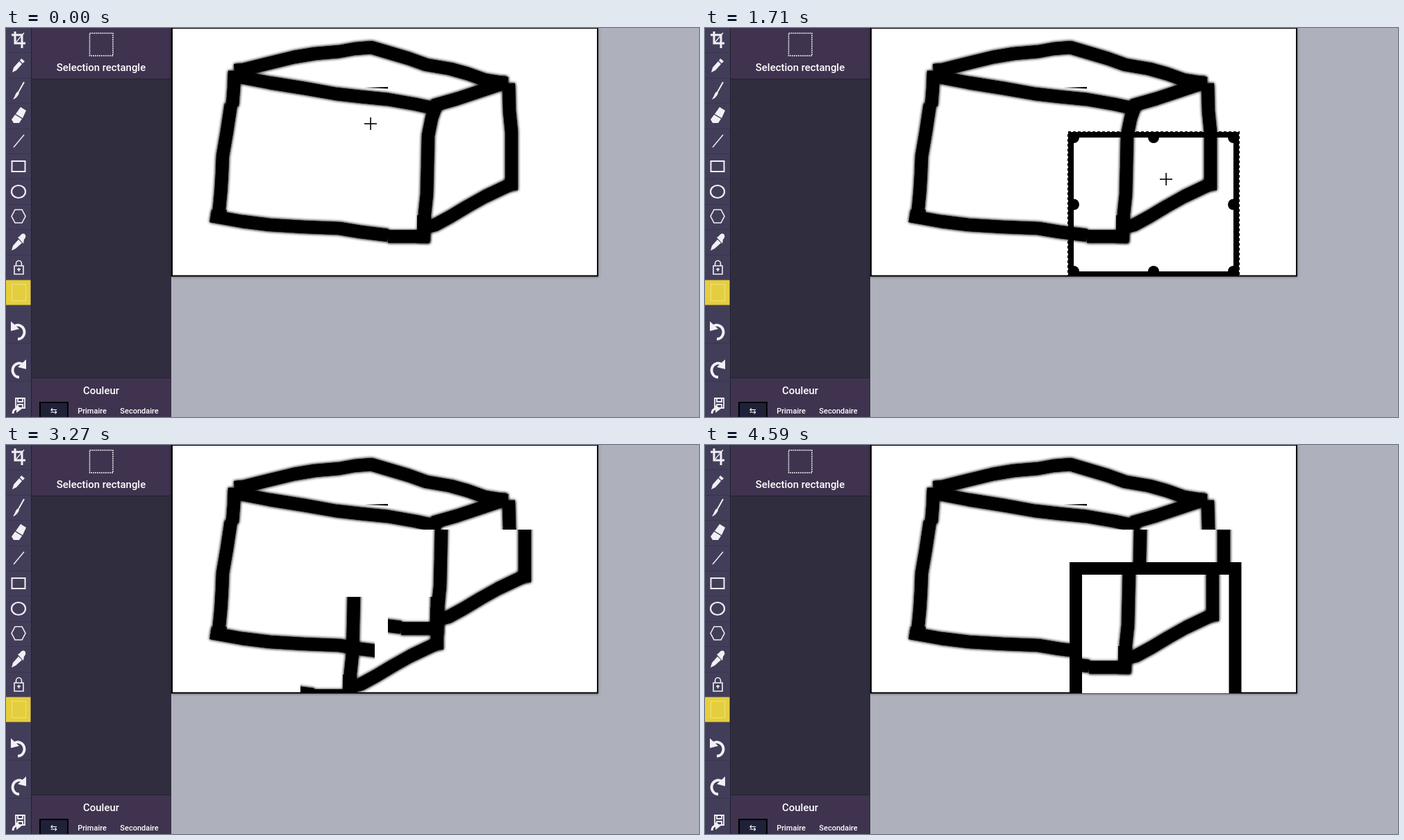
An HTML page with a canvas for the animation above (4.68 s loop, 998 px wide and 561 px high).

```html
<!DOCTYPE html>
<html lang="fr">
<head>
<meta charset="utf-8">
<style>
html, body { margin: 0; width: 100%; height: 100%; overflow: hidden; background: #aeb1bc; }
canvas { display: block; }
</style>
</head>
<body>
<canvas id="stage" width="998" height="561"></canvas>
<script>
const LOOP = 4680, STEP = 30;
const SEL = { x: 531, y: 158, w: 230, h: 193 };
const ctx = document.getElementById('stage').getContext('2d');

function layer(paint) {
  const c = document.createElement('canvas');
  c.width = 998;
  c.height = 561;
  paint(c.getContext('2d'));
  return c;
}

function box(g, color, x, y, w, h) {
  g.fillStyle = color;
  g.fillRect(x, y, w, h);
}

// ---- toolbar and panel ----
const strokeIcons = [
  [3, 'M13 5V22H28M8 10H23V29'],
  [1.3, 'M14 21L26 7'],
  [2, 'M26 78L17 94'],
  [1.4, 'M11 172L26 154'],
  [2, 'M8.5 192H27.5V207H8.5Z'],
  [2.2, 'M8 236a10 9 0 1 0 20 0a10 9 0 1 0-20 0'],
  [1.6, 'M8 271.5L13 262H23L28 271.5L23 281H13Z'],
  [1.6, 'M12 343H25V355H12ZM14.5 343V340a4 4.5 0 0 1 8 0V343M18.5 346V351M16 348H21'],
  [1.8, 'M14 534H27V548H14ZM17 534V539H24V534M17 548V543H24V548'],
  [3, 'M10 556Q10 549 17 549']
];
const fillIcons = [
  'M9 64L11 57L19 48L23 52L15 61ZM20 47L22 44L27 48L24 51Z',
  'M16 92L19 94Q16 101 10 103Q13 98 14 95Z',
  'M8 132L13 125L23 131L19 137H11ZM14 124L21 114L29 119L24 130Z',
  'M8 321L10 314L18 305L23 310L14 318ZM17 302L20 300Q23 295 27 297Q30 301 26 305L25 311Z',
  'M15 544L23 549L15 555Z'
];

function turnArrow(g) {
  g.lineWidth = 3.8;
  g.stroke(new Path2D('M12 430A9.5 10 0 1 1 17 448.5'));
  g.fill(new Path2D('M7 423V437L19 434Z'));
}

const ui = layer(g => {
  box(g, '#aeb1bc', 0, 0, 998, 561);
  box(g, '#423e59', 0, 0, 36, 561);
  for (let i = 1; i < 12; i++) box(g, '#393550', 0, Math.round(i * 36.4) - 1, 36, 1);
  for (const y of [454, 509]) box(g, '#393550', 0, y, 36, 1);
  box(g, '#e5ce3d', 0, 363.5, 35.5, 36);
  box(g, '#302d3e', 36, 0, 202, 561);
  box(g, '#3f334f', 37, 0, 200, 73);
  box(g, '#3f334f', 37, 505, 200, 56);
  box(g, '#242130', 36, 0, 1, 561);
  box(g, '#242130', 37, 73, 200, 1);
  box(g, '#242130', 37, 504, 200, 1);

  g.strokeStyle = g.fillStyle = '#f1f0f5';
  for (const [width, path] of strokeIcons) {
    g.lineWidth = width;
    g.stroke(new Path2D(path));
  }
  for (const path of fillIcons) g.fill(new Path2D(path));
  turnArrow(g);
  g.save();
  g.translate(36, 55);
  g.scale(-1, 1);
  turnArrow(g);
  g.restore();

  g.setLineDash([2, 1]);
  g.lineWidth = 1.5;
  g.strokeRect(120.5, 7.5, 33.5, 32.5);
  g.strokeStyle = '#f3e9a8';
  g.lineWidth = 1;
  g.strokeRect(8.5, 369.5, 20, 24);
  g.setLineDash([]);

  box(g, '#1f2139', 48, 539, 42, 24);
  g.strokeStyle = '#000';
  g.lineWidth = 2;
  g.strokeRect(49, 540, 40, 24);

  g.fillStyle = '#fff';
  g.textAlign = 'center';
  const label = (text, x, y, font) => {
    g.font = font;
    g.fillText(text, x, y);
  };
  label('Selection rectangle', 137, 62, '500 14.9px Roboto, sans-serif');
  label('Couleur', 137, 528, '500 14.9px Roboto, sans-serif');
  label('Primaire', 124, 556, '500 11px Roboto, sans-serif');
  label('Secondaire', 192, 556, '500 11px Roboto, sans-serif');
  label('⇆', 69, 556, '12px "DejaVu Sans", sans-serif');

  g.shadowColor = 'rgba(0,0,0,.4)';
  g.shadowBlur = 4;
  box(g, '#000', 238, 0, 615, 358.5);
});

// ---- the hand-drawn box ----
const strokes = [
  'M329 61L342 60L378 51L415 42L445 37L480 34L502 30L526 28L580 44L605 53L640 59L665 66L690 75L722 80',
  'M333 70L380 79L430 87L475 95L510 99L550 103L590 110L622 117',
  'M329 62L328 87L326 112',
  'M324 110L318 150L312 185L311 210L309.5 235L306 272',
  'M295 271L340 279L380 284L430 287L480 289L510 294L550 299',
  'M550 300.5H609.5',
  'M621 108L613 130L608 155L607 200L606 240L603 268L601 309',
  'M615 112L650 102L680 92L722 78',
  'M724 80L725 120L728 150V234',
  'M598 289L618 284L640 272L665 257L690 243L730 224'
];

const art = layer(g => {
  box(g, '#fff', 240, 1, 611, 355.5);
  g.lineWidth = 18;
  g.lineJoin = 'round';
  g.shadowColor = 'rgba(0,0,0,.85)';
  g.shadowBlur = 4;
  // The brush goes over each line twice, which darkens its soft edge.
  for (const path of [...strokes, ...strokes]) g.stroke(new Path2D(path));
  g.shadowColor = 'transparent';
  box(g, '#000', 592, 270, 17, 39);
  g.fill(new Path2D('M516 86L550 85V87.5Z'));
  g.fill(new Path2D('M293 280L302 262L318 262L315 283Z'));
});

function paste(g, x, y) {
  g.drawImage(art, SEL.x, SEL.y, SEL.w, SEL.h, x, y, SEL.w, SEL.h);
}

const holed = layer(g => {
  g.drawImage(art, 0, 0);
  box(g, '#fff', SEL.x, SEL.y, SEL.w, SEL.h);
});

const moved = layer(g => {
  g.drawImage(holed, 0, 0);
  paste(g, 550, 122);
});

// ---- pointer path: time, x, y ----
const path = [
  [0, 525, 138], [120, 525, 138], [210, 531, 158], [630, 593, 274], [720, 593, 274],
  [1080, 757, 386], [1230, 761, 351], [1260, 761, 351], [1500, 690, 130], [1710, 664, 218],
  [2580, 664, 218], [2730, 638, 212], [2970, 520, 206], [3000, 492, 209], [3060, 455, 242],
  [3180, 500, 310], [3360, 640, 320], [3480, 739, 298], [3570, 711, 283], [3600, 679, 279],
  [3720, 649, 275], [LOOP, 649, 274.5]
];

function slope(i, axis) {
  if (i < 1 || i > path.length - 2) return 0;
  const rate = k => (path[k + 1][axis] - path[k][axis]) / (path[k + 1][0] - path[k][0]);
  const a = rate(i - 1), b = rate(i);
  return a * b > 0 ? 2 * a * b / (a + b) : 0;
}

// Monotone cubic interpolation, so the pointer never overshoots a key.
function pointer(t) {
  let i = 0;
  while (i < path.length - 2 && path[i + 1][0] <= t) i++;
  const span = path[i + 1][0] - path[i][0], u = (t - path[i][0]) / span;
  const at = axis => {
    const p = path[i][axis], q = path[i + 1][axis];
    return p + (q - p) * u * u * (3 - 2 * u)
      + span * u * (1 - u) * ((1 - u) * slope(i, axis) - u * slope(i + 1, axis));
  };
  return { x: Math.round(at(1)), y: Math.round(at(2)) };
}

function marquee(w, h) {
  ctx.lineWidth = 16;
  ctx.strokeRect(SEL.x, SEL.y, w, h);
  ctx.lineWidth = 2;
  ctx.setLineDash([4, 3]);
  ctx.strokeRect(SEL.x - 8, SEL.y - 8, w + 16, h + 16);
  ctx.setLineDash([]);
}

function handles() {
  ctx.fillStyle = '#000';
  for (const fx of [0, 0.5, 1]) {
    for (const fy of [0, 0.5, 1]) {
      if (fx === 0.5 && fy === 0.5) continue;
      ctx.beginPath();
      ctx.arc(SEL.x + SEL.w * fx, SEL.y + SEL.h * fy, 8, 0, 7);
      ctx.fill();
    }
  }
}

function floating(x, y) {
  ctx.globalCompositeOperation = 'multiply';
  paste(ctx, x, y);
  ctx.globalCompositeOperation = 'source-over';
}

function dropped(x, y) {
  paste(ctx, x, y);
  ctx.lineWidth = 18;
  ctx.strokeRect(x, y, 229.5, SEL.h);
}

function cross({ x, y }) {
  box(ctx, '#000', x - 9, y - 0.7, 18, 1.6);
  box(ctx, '#000', x - 0.7, y - 9, 1.6, 18);
}

function draw(t) {
  const cursor = pointer(t);
  ctx.strokeStyle = '#000';
  ctx.drawImage(ui, 0, 0);
  ctx.save();
  ctx.beginPath();
  ctx.rect(238, 0, 615, 358);
  ctx.clip();
  ctx.drawImage(t < 1860 ? art : t < 2130 ? holed : moved, 0, 0);

  if (t >= 210 && t < 1260) {
    marquee(cursor.x - SEL.x, cursor.y - SEL.y);
  } else if (t >= 1260 && t < 1860) {
    marquee(SEL.w, SEL.h);
    paste(ctx, SEL.x, SEL.y);
    handles();
  } else if (t >= 1860 && t < 1980) {
    floating(550, 122);
  } else if (t >= 1980 && t < 2130) {
    dropped(550, 122);
  } else if (t >= 2580 && t < 4110) {
    // The dragged copy trails the pointer by one step.
    const center = pointer(t - STEP);
    floating(center.x - 115, center.y - 96);
  } else if (t >= 4110) {
    dropped(534, 178);
  }
  ctx.restore();
  if (t < 1980 || (t >= 2130 && t < 4110)) cross(cursor);
}

const start = performance.now();
function tick() {
  const t = (performance.now() - start) % LOOP;
  draw(Math.floor(t / STEP) * STEP);
  requestAnimationFrame(tick);
}
tick();
</script>
</body>
</html>
```
